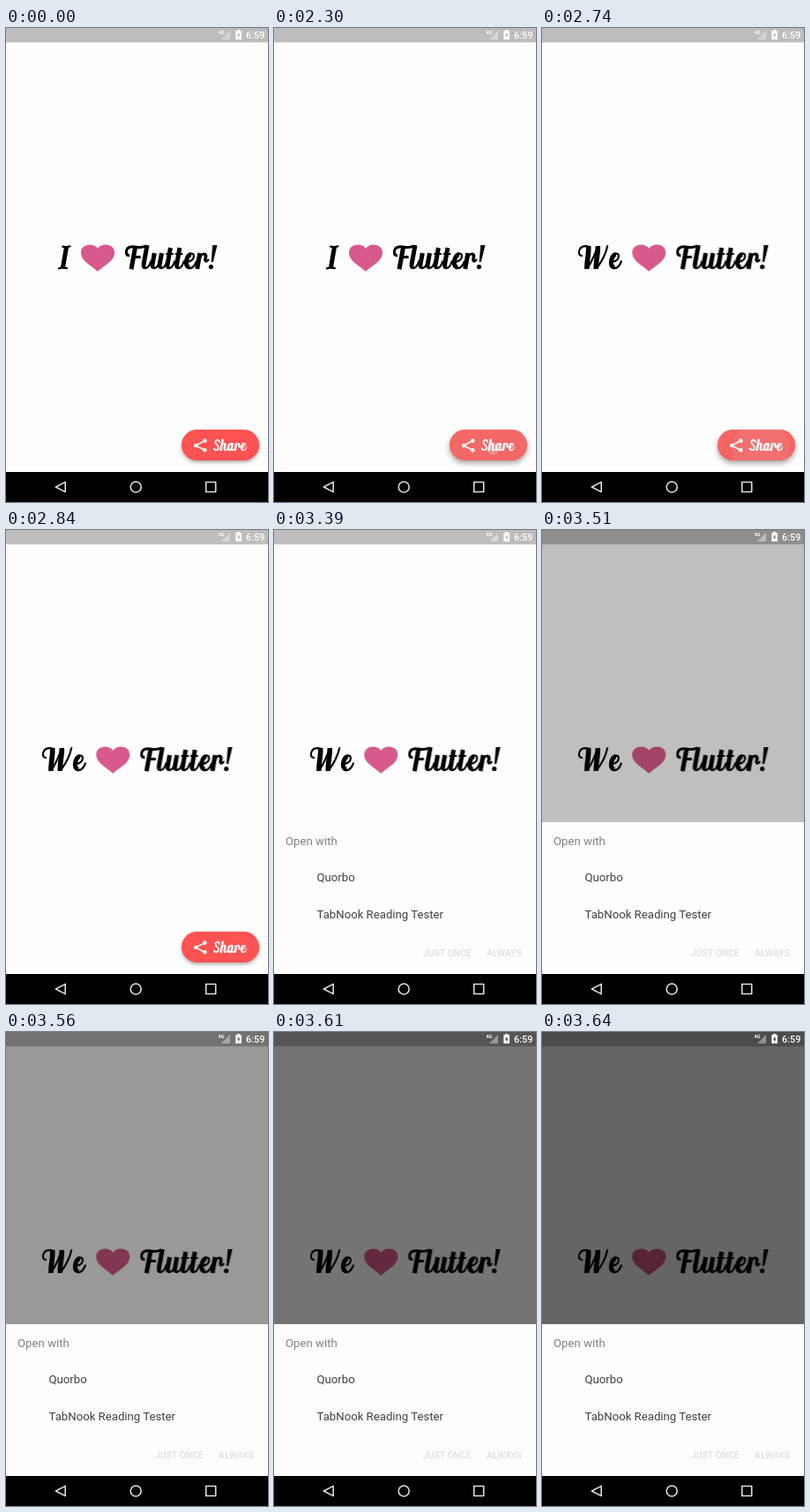
Write an HTML page that moves like this. It is 297 px wide and 537 px high and loops after 5.37 s.

```html
<!DOCTYPE html>
<html lang="en">
<head>
<meta charset="utf-8">
<title>Share sheet</title>
<style>
html, body { margin: 0; width: 100%; height: 100%; overflow: hidden; background: #fefefe; }
svg { display: block; width: 297px; height: 537px; font-family: Roboto, sans-serif; }

/* script lettering: heavy downstrokes, hairline joins */
.ink { fill: none; stroke: currentColor; stroke-linejoin: round; }
.heavy { stroke-width: 5; }
.mid { stroke-width: 3.7; }
.fine { stroke-width: 2.2; stroke-linecap: round; }

.me, .we, .words, .press, .splash, .pill, .dim, .sheet {
  animation: 5370ms step-end infinite;
}
.me { animation-name: me; }
.we { animation-name: we; }
.words { animation-name: words; }
.pill { animation-name: pill; }
.press { animation-name: press; }
.splash { animation-name: splash; transform-origin: 248px 477px; }
.dim { animation-name: dim; }
.sheet { animation-name: sheet; }

@keyframes me { 0% { opacity: 1 } 51.024%, 100% { opacity: 0 } }
@keyframes we { 0% { opacity: 0 } 51.024%, 100% { opacity: 1 } }
@keyframes words {
  0% { transform: none }
  51.024%, 100% { transform: translateX(17.3px) }
}
@keyframes pill {
  0%, 52.886%, 100% { filter: drop-shadow(0 2px 2px rgba(0, 0, 0, .33)) }
  42.831%, 51.024% { filter: drop-shadow(0 3px 3px rgba(0, 0, 0, .36)) }
  43.575% { filter: drop-shadow(0 4px 3px rgba(0, 0, 0, .38)) }
}
@keyframes press {
  0%, 52.886%, 100% { opacity: 0 }
  42.831% { opacity: .19 }
  43.575% { opacity: .3 }
  51.024% { opacity: .15 }
}
@keyframes splash {
  0%, 52.886%, 100% { opacity: 0; transform: scale(1) }
  42.831% { opacity: .4; transform: scale(1) }
  43.575% { opacity: .3; transform: scale(2.4) }
  51.024% { opacity: .12; transform: scale(5) }
}
@keyframes dim {
  0% { opacity: 0 }
  64.618% { opacity: .115 }
  65.363% { opacity: .25 }
  66.294% { opacity: .4 }
  67.225% { opacity: .54 }
  67.784%, 100% { opacity: .6 }
}
@keyframes sheet { 0% { opacity: 0 } 63.128%, 100% { opacity: 1 } }
</style>
</head>
<body>
<svg viewBox="0 0 297 537">
  <defs>
    <clipPath id="pillClip"><rect x="199" y="455" width="88" height="35" rx="17.5"/></clipPath>

    <path id="join" class="fine" d="M4 -1.2C7 -.8 9.3 -4 10.6 -8.5"/>
    <g id="stroke">
      <path class="heavy" d="M4.8 -18L2.6 -6C2.1 -2.4 3 -2 5 -2.2"/>
      <use href="#join"/>
    </g>
    <g id="I">
      <path class="heavy" d="M9.6 -25.5L5.4 -1.2"/>
      <path class="fine" d="M5.2 -25.3C8 -24.7 11 -24.8 13.6 -25.7M.8 -.6C3.5 -1.8 6.5 -1.6 10 -.9"/>
    </g>
    <g id="W">
      <path stroke-width="5.6" d="M11.6 -26C12.6 -18 9.4 -9 10 0M22.2 -26C23 -18 19.8 -9 20.4 0"/>
      <path class="fine" stroke-linecap="round" d="M4.2 -15C.4 -15 .2 -20 2.2 -23C4.4 -26 8 -26.2 11.6 -25.4M10.8 -1.2C15.5 -9 19.5 -17 21.6 -25M21.2 -1.2C26.5 -8 31 -16 33.2 -26"/>
    </g>
    <g id="F">
      <path class="heavy" d="M11.6 -25L7 .2"/>
      <path stroke-width="3.1" d="M5 -15.4C.8 -14.8 .6 -20 2.5 -22.8C4.7 -26 9.5 -25.4 13 -24.8C17 -24.2 20 -24.3 23 -26M9 -12.8C11 -14.3 14 -12.9 17.6 -13.8"/>
    </g>
    <g id="l">
      <path class="heavy" d="M6.5 -27L2.7 -6C2.2 -2.4 3 -2 5 -2.2"/>
      <use href="#join"/>
    </g>
    <g id="u"><use href="#stroke"/><use href="#stroke" x="8.2"/></g>
    <g id="t">
      <path class="heavy" d="M5.9 -24L2.7 -6C2.2 -2.4 3 -2 5 -2.2"/>
      <path class="fine" d="M1.6 -17H8.6"/>
      <use href="#join"/>
    </g>
    <g id="e">
      <path class="heavy" d="M8.4 -16.6C4.5 -16 2.8 -10.5 2.8 -7C2.8 -3.4 4.4 -2 7 -2.1"/>
      <path class="fine" d="M4.5 -8.2C8.5 -9 11.4 -11.4 11.4 -14.6C11.4 -16.8 10.2 -17.6 8.4 -17.3M6.5 -1C10 -.6 12.6 -4 14.4 -8.5"/>
    </g>
    <g id="r">
      <path class="heavy" d="M4.8 -18L1.7 0"/>
      <path class="fine" d="M3.6 -8.5C5 -14 7 -17.2 9.3 -17.2M10.4 -10.5C10.2 -7.4 13 -8 14.4 -10.4"/>
      <path class="mid" d="M8.8 -16.6C12.4 -17 11.8 -13.4 10.6 -9.6"/>
    </g>
    <g id="S">
      <path class="mid" d="M14.8 -19C16.5 -26 6.8 -27.5 6 -20.5C5.5 -14.5 14 -13 13 -6.6C12 -.2 3 -.2 2.4 -6.2"/>
    </g>
    <g id="h">
      <path class="heavy" d="M6.6 -27L1.8 0"/>
      <path class="fine" d="M3.5 -8.5C5 -14 8 -17.2 10.6 -17"/>
      <path class="heavy" d="M9.8 -16.2C13 -16.4 11.4 -11 10.6 -6C10.1 -2.4 11 -2 13 -2.2"/>
      <use href="#join" x="8.2"/>
    </g>
    <g id="a">
      <path class="heavy" d="M8.6 -16.6C4.5 -16 2.6 -10.5 2.6 -7C2.6 -3.4 4 -2 6 -2.2"/>
      <path class="fine" d="M5.2 -1.2C8 -1.2 9.6 -5 10.4 -8.5M8 -17.3C10 -17.3 11 -16 11.6 -14"/>
      <use href="#stroke" x="7.8"/>
    </g>
  </defs>

  <rect width="297" height="537" fill="#fefefe"/>
  <rect width="297" height="16.3" fill="#bdbdbd"/>

  <g class="me"><g class="ink" role="img" aria-label="I" transform="translate(59 273)"><use href="#I"/></g></g>
  <g class="we"><g class="ink" role="img" aria-label="We" transform="translate(41 273)">
    <use href="#W"/><use href="#e" x="34.5"/>
  </g></g>
  <g class="words">
    <path transform="translate(85 245)" fill="#d8598b" d="M19 31C14.5 25.5 0 19.8 0 9.7C0 4 4 .5 10 .5C14 .5 17.5 2 19 5C20.5 2 24 .5 28 .5C34 .5 38 4 38 9.7C38 19.8 23.5 25.5 19 31Z"/>
    <g class="ink" role="img" aria-label="Flutter!" transform="translate(135 273)">
      <use href="#F"/><use href="#l" x="18.5"/><use href="#u" x="28.5"/>
      <use href="#t" x="45.5"/><use href="#t" x="56"/><use href="#e" x="66.5"/>
      <use href="#r" x="80"/>
      <path fill="currentColor" stroke="none" d="M99.2 -27H104.4L99.8 -8H97.6Z"/>
      <circle cx="97.4" cy="-2.4" r="2.6" fill="currentColor" stroke="none"/>
    </g>
  </g>

  <g class="pill"><rect x="199" y="455" width="88" height="35" rx="17.5" fill="#ff5252"/></g>
  <g clip-path="url(#pillClip)">
    <rect class="press" x="199" y="455" width="88" height="35" fill="#c4c4c4"/>
    <circle class="splash" cx="248" cy="477" r="6.5" fill="#c8c8c8"/>
  </g>
  <g fill="#fff">
    <path d="M225.5 467.5L215 473L225.5 478.5" fill="none" stroke="#fff" stroke-width="1.5"/>
    <circle cx="225.3" cy="467.6" r="2.3"/>
    <circle cx="215.2" cy="473" r="2.3"/>
    <circle cx="225.3" cy="478.3" r="2.3"/>
  </g>
  <g class="ink" color="#fff" role="img" aria-label="Share" transform="translate(234.5 479) scale(.49)">
    <use href="#S"/><use href="#h" x="16.5"/><use href="#a" x="33"/><use href="#r" x="49.5"/><use href="#e" x="63.5"/>
  </g>

  <rect class="dim" width="297" height="503"/>

  <g class="sheet">
    <rect y="331" width="297" height="172" fill="#fefefe"/>
    <g font-size="13.2">
      <text x="13" y="357" fill="#808080">Open with</text>
      <g fill="#404040">
        <text x="48.5" y="398.3">Quorbo</text>
        <text x="48.5" y="439.5">TabNook Reading Tester</text>
      </g>
    </g>
    <g font-size="10.4" font-weight="500" fill="#dedede">
      <text x="169" y="482.6">JUST ONCE</text>
      <text x="241" y="482.6">ALWAYS</text>
    </g>
  </g>

  <g fill="#fff">
    <text x="240.5" y="7" font-size="5.5" font-weight="700">4G</text>
    <path d="M244 13H254V3Z" opacity=".38"/>
    <path fill-rule="evenodd" d="M260.3 3.2H262.2V2H265V3.2H267V13H260.3ZM264.2 4.8L261.7 8.6H263.2V11.6L265.7 7.6H264.2Z"/>
    <text x="272" y="11.6" font-size="10.8" font-weight="500">6:59</text>
  </g>

  <rect y="503" width="297" height="34"/>
  <g fill="none" stroke="#dedede" stroke-width="1.6" stroke-linejoin="round">
    <path d="M67.2 514.4V525.6L56.4 520Z"/>
    <circle cx="147.2" cy="520" r="6"/>
    <rect x="226.7" y="514.5" width="11" height="11"/>
  </g>
</svg>
</body>
</html>
```
